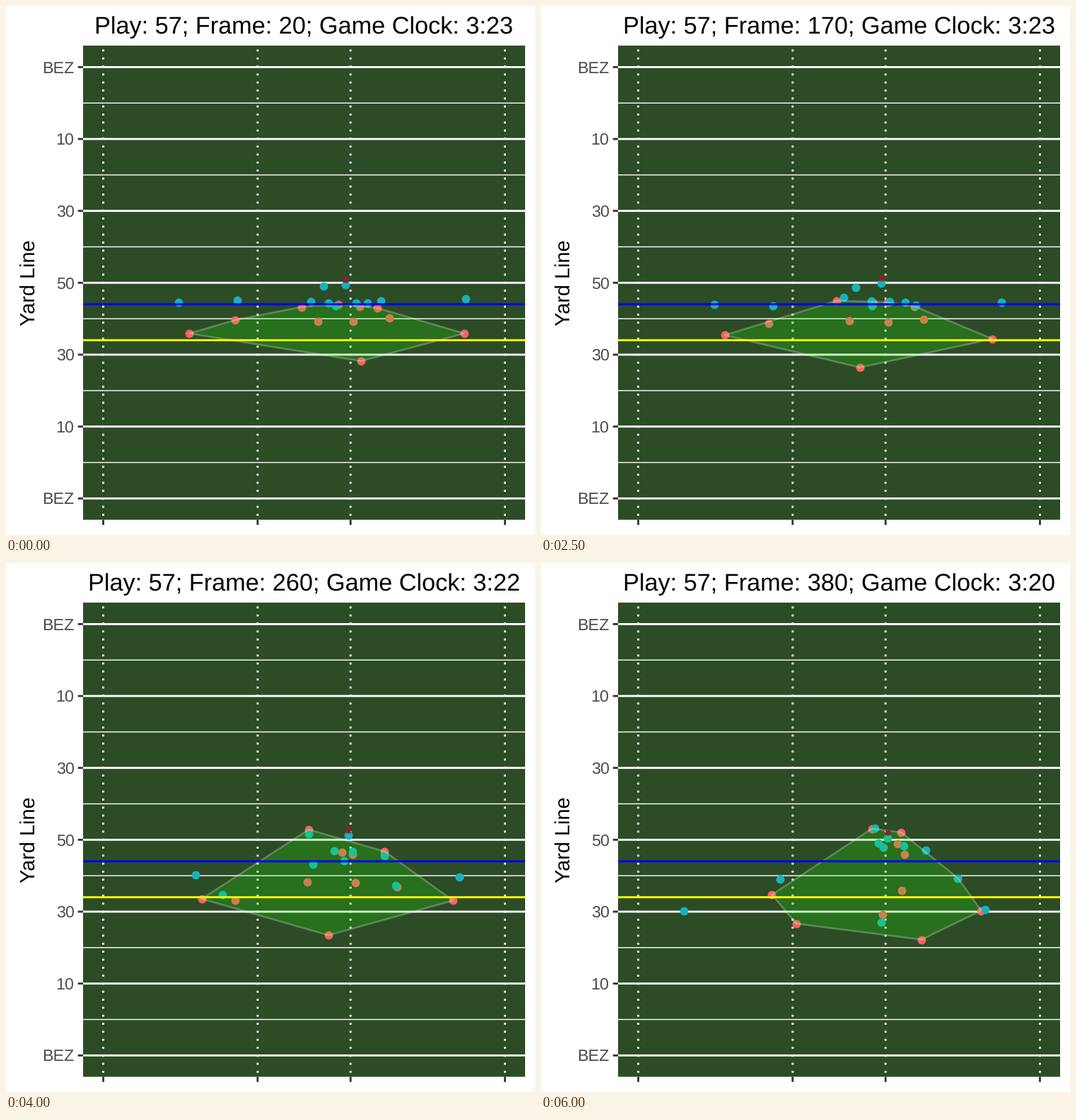
Write a matplotlib script that moves like this. It is 748x748 px and loops after 6.5 s.

```python
import numpy as np
import matplotlib.pyplot as plt
from matplotlib.animation import FuncAnimation
from matplotlib.patches import Polygon, Rectangle

SIZE = 748
DPI = 100
PT = 72 / DPI  # points per pixel
STEPS, INTERVAL = 13, 500

LEFT, RIGHT, TOP, BOTTOM = 109, 734, 56, 726.5
FIELD = "#2c4c26"
RED, TEAL, BALL = "#f7625e", "#18b2bc", "#9c1a22"

plt.rcParams["font.family"] = "Liberation Sans"
plt.rcParams["text.hinting"] = "none"
plt.rcParams["path.snap"] = False

# Steps of a path's key points: line-up, snap, contact, end.
# A path with three points stands still until the snap.
KEY_STEPS = (0, 4, 7, 12)

DEFENCE = [
    [(259, 463), (268.5, 474), (326.5, 469)],
    [(324, 444), (320, 469), (361, 510)],
    [(418, 425.5), (422, 383.5), (468, 375.5)],
    [(470, 421.5), (471, 412), (504, 397)],
    [(500, 425), (492, 421.5), (487, 413), (514, 412)],
    [(525, 427), (537, 413.5), (509.5, 381)],
    [(441, 446), (421.5, 444.5), (483, 497)],
    [(491, 446), (492, 449.5), (510, 463)],
    [(542.5, 441), (543, 452), (622.5, 491.5)],
    [(648, 463), (638, 466), (638, 479.5), (589.5, 445.5)],
    [(502, 502), (458, 506), (446.5, 523), (538, 532.5)],
]
OFFENCE = [
    [(244, 418.5), (257, 437.5), (338, 447)],
    [(327, 415.5), (321.5, 459), (202, 491.5)],
    [(431, 418), (423, 389), (472, 375)],
    [(456, 420), (468, 420), (463, 410.5), (477.5, 396)],
    [(466, 424), (475.5, 424), (484, 402)],
    [(495, 419.5), (488, 410), (513, 400)],
    [(511.5, 420), (530.5, 416), (544, 405.5)],
    [(530, 417), (539, 447), (628.5, 490)],
    [(650.5, 414), (648.5, 440), (589.5, 445.5)],
    [(449.5, 396), (430.5, 412.5), (481, 508)],
    [(480, 394), (483, 386), (490, 389)],
]
PIGSKIN = [(480, 387), (483, 379), (490, 380.5)]


def place(path, step):
    """Point on a smooth cubic path through its key points."""
    p = np.array(path, float)
    t = np.array(KEY_STEPS[-len(path):], float)
    if step <= t[0]:
        return p[0]
    slope = np.gradient(p, t, axis=0)
    if t[0] > 0:
        slope[0] = 0  # starts from a standstill
    i = min(np.searchsorted(t, step, side="right") - 1, len(t) - 2)
    h = t[i + 1] - t[i]
    u = (step - t[i]) / h
    ease = u * u * (3 - 2 * u)
    return (p[i] + (p[i + 1] - p[i]) * ease
            + h * u * (1 - u) ** 2 * slope[i]
            - h * u * u * (1 - u) * slope[i + 1])


def team_at(team, step):
    return np.array([place(path, step) for path in team])


def convex_hull(points):
    points = sorted(map(tuple, points))

    def half(seq):
        chain = []
        for p in seq:
            while len(chain) > 1:
                (ax, ay), (bx, by) = chain[-2:]
                if (bx - ax) * (p[1] - ay) - (by - ay) * (p[0] - ax) > 0:
                    break
                chain.pop()
            chain.append(p)
        return chain[:-1]

    return half(points) + half(points[::-1])


fig = plt.figure(figsize=(SIZE / DPI, SIZE / DPI), dpi=DPI, facecolor="white")
ax = fig.add_axes([0, 0, 1, 1])
ax.set_xlim(0, SIZE)
ax.set_ylim(SIZE, 0)
ax.axis("off")


def line(x, y, color, width, z, **style):
    ax.plot(x, y, color=color, lw=width * PT, zorder=z,
            solid_capstyle="butt", dash_capstyle="butt", **style)


def dots(color, z):
    return ax.plot([], [], "o", ms=11.85 * PT, mew=0, color=color, zorder=z)[0]


def draw_field():
    ax.add_patch(Rectangle((LEFT, TOP), RIGHT - LEFT, BOTTOM - TOP,
                           fc=FIELD, lw=0, zorder=0))
    labels = ["BEZ", "10", "30", "50", "30", "10", "BEZ"]
    gap = 101.65
    for i, label in enumerate(labels):
        y = 86.4 + gap * i
        line([LEFT, RIGHT], [y, y], "white", 2.83, 1)
        line([LEFT - 7.3, LEFT], [y, y], "#333333", 2.83, 1)
        ax.text(96.5, y + 8.1, label, ha="right", va="baseline",
                size=23.2 * PT, color="#4d4d4d")
        if i < len(labels) - 1:
            line([LEFT, RIGHT], [y + gap / 2] * 2, "white", 1.41, 1)
    for x in (137.5, 355.8, 487.2, 705.5):
        line([x, x], [BOTTOM, TOP], "white", 2.83, 1, ls=(2, (1, 3)))
        line([x, x], [BOTTOM, BOTTOM + 7.3], "#333333", 2.83, 1)
    line([LEFT, RIGHT], [421.8] * 2, "#0000ff", 2.9, 6)
    line([LEFT, RIGHT], [472.6] * 2, "#ffff00", 2.9, 6)
    ax.text(41, 391.5, "Yard Line", rotation=90, ha="center", va="baseline",
            rotation_mode="anchor", size=28.9 * PT, color="black")


draw_field()
defence = dots(RED, 2)
offence = dots(TEAL, 3)
ball = ax.plot([], [], marker=(8, 2, 0), ms=9 * PT, mew=1.4 * PT,
               color=BALL, zorder=5)[0]
hull = ax.add_patch(Polygon([(0, 0), (0, 0), (0, 0)], closed=True,
                            fc=(0.1, 1, 0, 0.2), ec=(1, 1, 1, 0.25),
                            lw=2.6 * PT, joinstyle="round", zorder=4))
title = ax.text(421.3, 39.3, "", ha="center", va="baseline", size=34.3 * PT,
                color="black")


def update(step):
    defenders = team_at(DEFENCE, step)
    defence.set_data(*defenders.T)
    offence.set_data(*team_at(OFFENCE, step).T)
    ball.set_data(*team_at([PIGSKIN], step).T)
    hull.set_xy(convex_hull(defenders))
    count = 20 + 30 * step
    seconds = 23 - max(0, (count - 170) // 60)
    title.set_text(f"Play: 57; Frame: {count}; Game Clock: 3:{seconds}")
    return defence, offence, ball, hull, title


anim = FuncAnimation(fig, update, frames=STEPS, interval=INTERVAL,
                     init_func=lambda: update(0), repeat=True)
plt.show()
```
